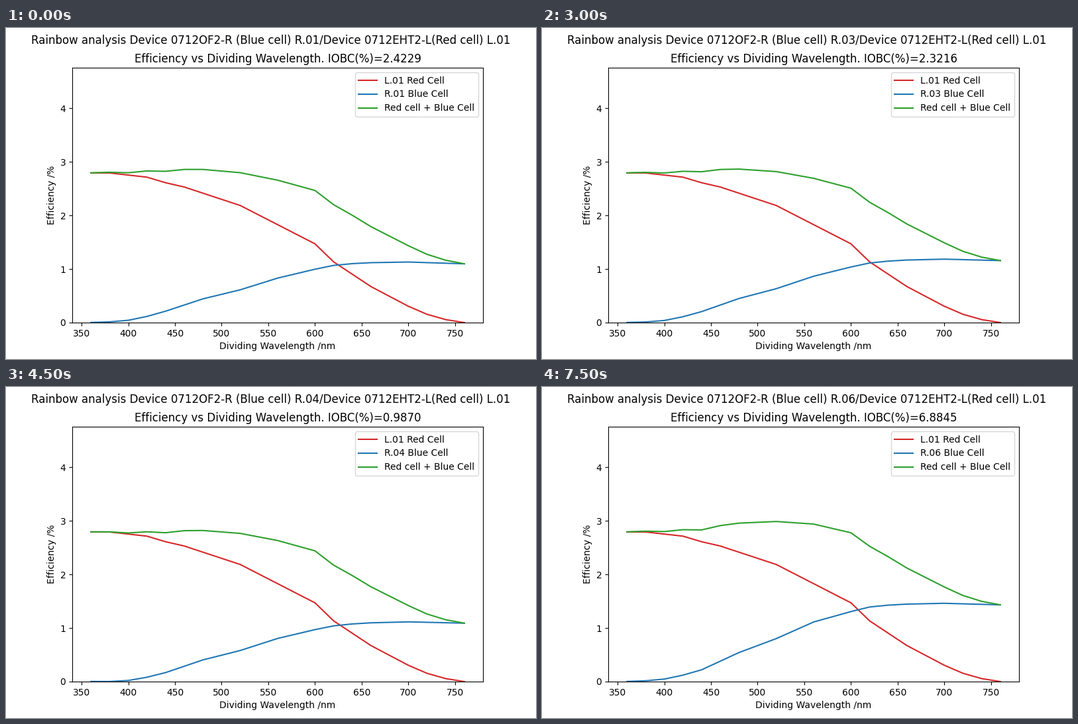
Recreate the animation shown at these times as a matplotlib script. Size 800 by 500 pixels, loop 8000 ms.

```python
import numpy as np
import matplotlib.pyplot as plt
from matplotlib.animation import FuncAnimation

INTERVAL = 500   # ms per frame
HOLD = 3         # frames each device pair stays on screen
FRAMES = 16

wavelength = np.arange(360, 761, 20)


def through(points):
    """Sample a curve through (wavelength, efficiency) key points."""
    x, y = zip(*points)
    return np.interp(wavelength, x, y)


red = through([(360, 2.792), (380, 2.792), (420, 2.714), (440, 2.61), (460, 2.53),
               (520, 2.185), (600, 1.47), (620, 1.133), (660, 0.672), (700, 0.305),
               (720, 0.155), (740, 0.056), (760, 0)])

base_blue = through([(360, 0.003), (380, 0.013), (400, 0.043), (420, 0.115),
                     (440, 0.213), (480, 0.443), (520, 0.612), (560, 0.83),
                     (600, 0.996), (620, 1.067), (640, 1.1), (660, 1.118),
                     (700, 1.13), (760, 1.097)])

# Per device: IOBC and its gain over the base curve at the bend wavelengths
BENDS = (360, 440, 560, 620, 760)
DEVICES = [
    (2.4229, (0, 0, 0, 0, 0)),
    (2.7061, (0, 0.004, 0.028, 0.033, 0.061)),
    (2.3216, (0, -0.008, 0.035, 0.045, 0.060)),
    (0.9870, (0, -0.045, -0.025, -0.027, -0.007)),
    (2.4820, (0, -0.038, 0.075, 0.115, 0.228)),
    (6.8845, (0, 0.007, 0.282, 0.325, 0.335)),
]

fig, ax = plt.subplots(figsize=(8, 5), dpi=100)
heading = fig.suptitle("")
title = ax.set_title("")
ax.set_xlim(340, 780)
ax.set_ylim(0, 4.756)
ax.set_xlabel("Dividing Wavelength /nm")
ax.set_ylabel("Efficiency /%")

ax.plot(wavelength, red, color="tab:red", label="L.01 Red Cell")
blue_line, = ax.plot(wavelength, base_blue, color="tab:blue", label="R.01 Blue Cell")
sum_line, = ax.plot(wavelength, red + base_blue, color="tab:green",
                    label="Red cell + Blue Cell")
blue_label = ax.legend(loc="upper right").get_texts()[1]


def update(frame):
    k = frame // HOLD
    iobc, gains = DEVICES[k]
    name = f"R.{k + 1:02d}"
    blue = np.maximum(base_blue + through(zip(BENDS, gains)), 0)
    blue_line.set_ydata(blue)
    sum_line.set_ydata(red + blue)
    blue_label.set_text(f"{name} Blue Cell")
    heading.set_text(f"Rainbow analysis Device 0712OF2-R (Blue cell) {name}"
                     "/Device 0712EHT2-L(Red cell) L.01")
    title.set_text(f"Efficiency vs Dividing Wavelength. IOBC(%)={iobc:.4f}")
    return blue_line, sum_line, blue_label, heading, title


anim = FuncAnimation(fig, update, frames=FRAMES, interval=INTERVAL,
                     repeat=True, repeat_delay=0, blit=False)
plt.show()
```
